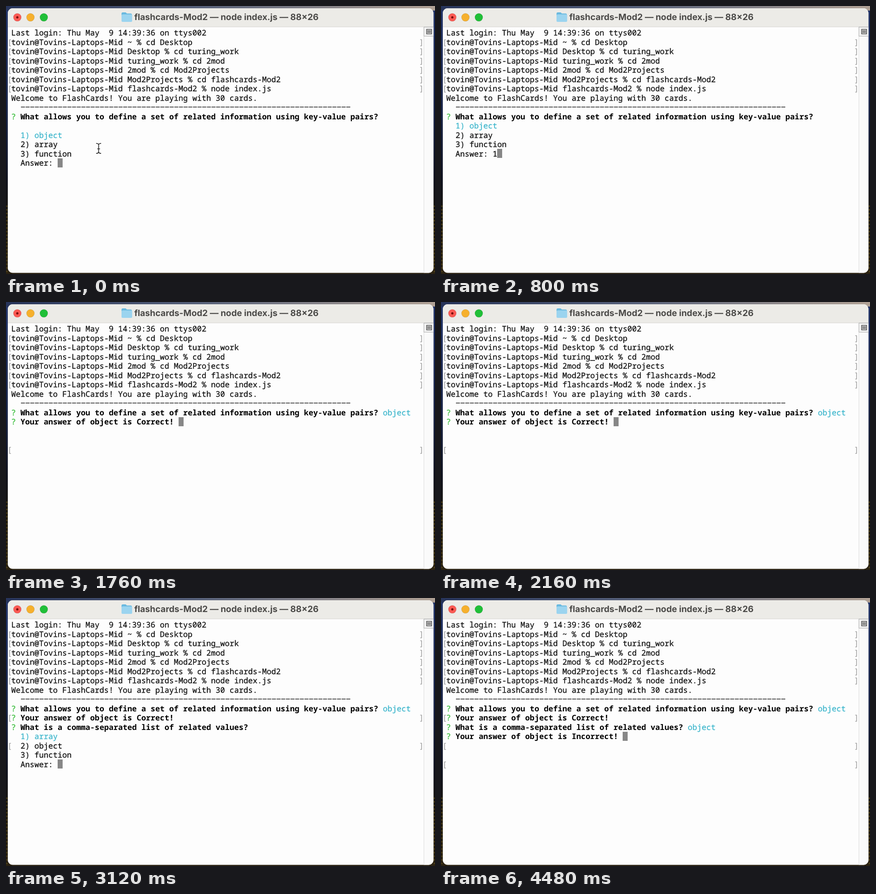
An HTML page for the animation above (4560 ms loop, 947 px wide and 591 px high).

```html
<!DOCTYPE html>
<html lang="en">
<head>
<meta charset="utf-8">
<title>Flash cards in a terminal</title>
<style>
  html, body { margin: 0; width: 100%; height: 100%; overflow: hidden; background: #151a2c; }
  svg { display: block; width: 947px; height: 591px; }
  text { text-rendering: geometricPrecision; white-space: pre; }
  .term { font: 500 17.1px "Noto Sans Mono", "DejaVu Sans Mono", monospace; fill: #111; stroke: #111; stroke-width: .3; }
  .title { font: 700 19.2px Inter, "Open Sans", sans-serif; fill: #4b4a48; text-anchor: middle; }
  .bold { font-weight: 700; fill: #000; stroke: none; }
  .cyan { fill: #3db6cc; stroke: #3db6cc; }
  .green { fill: #38bd3a; stroke: #38bd3a; }
  .mark { font-weight: 400; fill: #999; stroke: none; }
</style>
</head>
<body>
<svg viewBox="0 0 947 591">
  <defs>
    <linearGradient id="sky">
      <stop offset="0" stop-color="#27345a"/>
      <stop offset=".45" stop-color="#566079"/>
      <stop offset="1" stop-color="#b0a195"/>
    </linearGradient>
    <linearGradient id="side" x2="0" y2="1">
      <stop offset="0" stop-color="#24366a"/>
      <stop offset=".4" stop-color="#1a2547"/>
      <stop offset=".65" stop-color="#12141f"/>
      <stop offset=".8" stop-color="#1d190f"/>
      <stop offset="1" stop-color="#2b2212"/>
    </linearGradient>
    <clipPath id="frame"><rect x="4" y="5" width="939.5" height="583.5" rx="11"/></clipPath>
  </defs>

  <rect width="947" height="591" fill="url(#side)"/>
  <path d="M2 440V588M945.5 440V588" stroke="#4b3e18" stroke-width="3" stroke-dasharray="3 5"/>
  <rect width="947" height="10" fill="url(#sky)"/>

  <g clip-path="url(#frame)">
    <rect width="947" height="591" fill="#fdfdfd"/>
    <rect width="947" height="46" fill="#ecebe7"/>
    <path d="M0 46H947" stroke="#d3d2cf"/>
    <rect x="922.5" y="46" width="22" height="545" fill="#fafafa" stroke="#dcdcdc"/>
    <rect x="922.5" y="46.5" width="22" height="20" fill="#f3f3f3" stroke="#aaa"/>
  </g>
  <rect x="928.5" y="51.5" width="11" height="10" fill="#ddd" stroke="#444" stroke-width="1.4"/>
  <path d="M930 55H938M930 58H938" stroke="#444" stroke-width="1.4"/>

  <g stroke="#000" stroke-opacity=".12">
    <circle cx="25" cy="25" r="8.700" fill="#fb5a54"/>
    <circle cx="54" cy="25" r="8.700" fill="#f6b02d"/>
    <circle cx="83.500" cy="25" r="8.700" fill="#20bf38"/>
  </g>
  <circle cx="25" cy="25" r="2.500" fill="#750b08"/>
  <path d="M255 17q0-3 3-3h6l3 2.500h8q3 0 3 3V32H255z" fill="#69b9df"/>
  <rect x="255" y="18.500" width="23.500" height="16.500" rx="2.500" fill="#9bd4ef"/>
  <text class="title" x="486.600" y="31">flashcards-Mod2 — node index.js — 88×26</text>

  <path d="M33 222.700H760.500" stroke="#222" stroke-width="1.600" stroke-dasharray="8.800 1.460"/>
  <g id="log" class="term"></g>
  <g id="live" class="term"></g>
  <rect id="caret" width="11" height="20" fill="#878787"/>
  <path id="pointer" d="M199 303q5 0 5.500 3q.5-3 5.500-3M204.500 306V322M199 325q5 0 5.500-3q.5 3 5.500 3M201.500 315H207.500"
        fill="none" stroke="#222" stroke-width="1.600"/>
</svg>
<script>
const LOOP = 4560, COL = 10.26, PITCH = 20.5, LEFT = 11.5, BASE = 65;
const el = id => document.getElementById(id);

const span = (cls, s) => `<tspan class="${cls}">${s}</tspan>`;
const cyan = s => span("cyan", s);
const ask = (s, answer = "") => span("green", "?") + span("bold", ` ${s} `) + cyan(answer);
const text = (x, row, s, cls = "") =>
  `<text class="${cls}" xml:space="preserve" x="${x}" y="${BASE + row * PITCH}">${s}</text>`;
const line = (row, s) => text(LEFT, row, s);
const lines = (row, list) => list.map((s, i) => line(row + i, s)).join("");
const marks = rows => rows.map(r => text(3, r, "[", "mark") + text(912, r, "]", "mark")).join("");

// A numbered menu with one highlighted choice and the typed reply.
const menu = (row, items, pick, typed) => lines(row, [
  ...items.map((s, i) => {
    const item = `  ${i + 1}) ${s}`;
    return i === pick ? cyan(item) : item;
  }),
  "  Answer: " + typed
]);

const shell = [["~", "cd Desktop"], ["Desktop", "cd turing_work"], ["turing_work", "cd 2mod"],
  ["2mod", "cd Mod2Projects"], ["Mod2Projects", "cd flashcards-Mod2"], ["flashcards-Mod2", "node index.js"]];

el("log").innerHTML = lines(0, [
  "Last login: Thu May  9 14:39:36 on ttys002",
  ...shell.map(([dir, cmd]) => `tovin@Tovins-Laptops-Mid ${dir} % ${cmd}`),
  "Welcome to FlashCards! You are playing with 30 cards."
]) + marks([1, 2, 3, 4, 5, 6]);

const first = "What allows you to define a set of related information using key-value pairs?";
const second = "What is a comma-separated list of related values?";
const right = "Your answer of object is Correct!";
const wrong = "Your answer of object is Incorrect!";
const set1 = ["object", "array", "function"], set2 = ["array", "object", "function"];
const solved = line(9, ask(first, "object")) + line(10, ask(right));

// Each screen: start time, caret column and row, content.
const screens = [
  [0, 10, 14, line(9, ask(first)) + menu(11, set1, 0, "")],
  [440, 11, 13, line(9, ask(first)) + menu(10, set1, 0, "1")],
  [1120, 36, 10, solved + marks([13])],
  [2640, 10, 15, solved + line(11, ask(second)) + menu(12, set2, 0, "") + marks([10, 13])],
  [3520, 11, 15, solved + line(11, ask(second)) + menu(12, set2, 1, "2") + marks([10, 13])],
  [4240, 38, 12, solved + line(11, ask(second, "object")) + line(12, ask(wrong)) + marks([10, 13, 15])]
];

let shown;
function draw(now) {
  const t = now % LOOP;
  const screen = screens.findLast(s => s[0] <= t);
  if (screen !== shown) {
    const [start, col, row, content] = shown = screen;
    el("live").innerHTML = content;
    el("caret").setAttribute("x", Math.round(LEFT + col * COL));
    el("caret").setAttribute("y", Math.round(BASE + row * PITCH - 16.2));
    el("pointer").style.display = start ? "none" : "";
  }
}

const begin = performance.now();
function tick() {
  draw(performance.now() - begin);
  requestAnimationFrame(tick);
}
tick();
</script>
</body>
</html>
```
